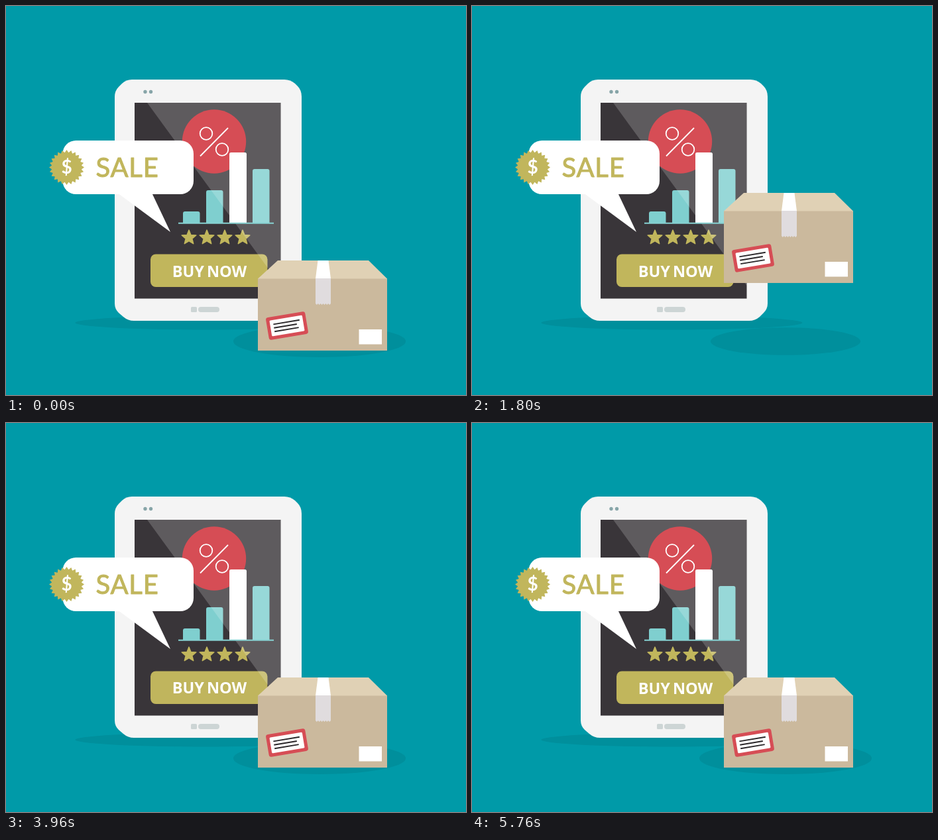
An HTML page for the animation above (5820 ms loop, 694 by 587 pixels).

```html
<!DOCTYPE html>
<html lang="en">
<head>
<meta charset="utf-8">
<title>Sale parcel</title>
<style>
  html, body { margin: 0; width: 100%; height: 100%; overflow: hidden; background: #009aa8; }
  svg { display: block; width: 100%; height: 100%; }
  .sale { font: 400 40px Lato, "Open Sans", sans-serif; letter-spacing: .8px; }
  .coin { font: 700 28px Lato, "Open Sans", sans-serif; }
  .buy { font: 700 23.5px "Open Sans", "Noto Sans", sans-serif; word-spacing: -2px; }
</style>
</head>
<body>
<svg viewBox="0 0 694 587">
  <defs>
    <clipPath id="aboveFloor"><rect y="-900" width="694" height="1469"/></clipPath>
    <clipPath id="doorway"><polygon id="opening"/></clipPath>
  </defs>
  <rect width="694" height="587" fill="#009aa8"/>
  <ellipse cx="301.500" cy="478" rx="197" ry="10.500" fill="#008f9c"/>
  <ellipse id="shadow" cx="473" cy="506" fill="#00808d" fill-opacity=".45"/>

  <g id="hole" clip-path="url(#doorway)">
    <polygon points="344,569 402,500 553,500 611,569" fill="#008592"/>
    <polygon points="344,569 402,500 476.500,500 390,569" fill="#007781"/>
  </g>

  <g id="tablet">
    <path fill="#f4f4f4" d="M190 111H420Q429 111 436 117L440 121Q446 127 446 137V449
      Q446 457 440 463L434 469Q427 475 418 475H193Q184 475 177 469L170 463
      Q164 457 164 449V137Q164 128 170 122L175 117Q181 111 190 111Z"/>
    <g fill="#87a5a8"><circle cx="210" cy="129.500" r="2.700"/><circle cx="218.500" cy="129.500" r="2.700"/></g>
    <g fill="#cdd5d5">
      <rect x="279" y="454" width="9" height="8" rx="1.500"/>
      <rect x="290" y="454" width="32" height="8" rx="4"/>
    </g>
    <rect x="194" y="146" width="220.500" height="295.500" fill="#393539"/>
    <g id="bars" fill="#7fcfcf"></g>
    <g id="stars" fill="#c1b65c" stroke="#c1b65c" stroke-width="1.500" stroke-linejoin="round"></g>
    <g id="button">
      <rect id="face" x="218" y="374.500" width="176.500" height="49.500" rx="8"/>
      <text class="buy" x="307" y="408.500" text-anchor="middle" fill="#fff">BUY NOW</text>
    </g>
    <polygon points="213,146 414.500,146 414.500,422" fill="#fff" fill-opacity=".19"/>
    <circle cx="314" cy="204.500" r="48.200" fill="#d64d55"/>
    <g fill="none" stroke="#fff" stroke-width="1.800">
      <path d="M335 184L293 226.500"/>
      <circle cx="302" cy="192.500" r="9.300"/><circle cx="326" cy="216.500" r="9.300"/>
    </g>
    <path d="M337 328V223.500Q337 221 339.500 221H360.500Q363 221 363 223.500V328Z" fill="#fff"/>
    <path d="M260 327.800H404" stroke="#86d1d1" stroke-width="2"/>
  </g>

  <g id="bubble">
    <rect x="85.500" y="203" width="197.500" height="81" rx="20" fill="#fff"/>
    <polygon points="168,282 220,282 248,341" fill="#fff"/>
    <polygon id="badge" fill="#c1b65c"/>
    <text class="coin" x="91.500" y="253" text-anchor="middle" fill="#fff">$</text>
    <text class="sale" x="135.500" y="257.500" fill="#c1b65c" stroke="#c1b65c" stroke-width="1" stroke-linejoin="round">SALE</text>
  </g>

  <g clip-path="url(#aboveFloor)">
    <g id="box">
      <rect x="380" y="411" width="195" height="109" fill="#cbb99d"/>
      <polygon points="410,384 547,384 575,411.500 380,411.500" fill="#e0d1b5"/>
      <polygon points="470.500,384 486.500,384 490,411.500 467,411.500" fill="#fff"/>
      <path id="tape" fill="#e0dcde"/>
      <g transform="translate(424 482.500) rotate(-9.500)">
        <rect x="-30" y="-17" width="60" height="34" rx="3.500" fill="#d64d55"/>
        <rect x="-25" y="-12" width="50" height="24" rx="1.500" fill="#fff"/>
        <path d="M-20 -5.500H20M-20 0H15M-20 5.500H17" stroke="#2b282b" stroke-width="1.900"/>
      </g>
      <rect x="532.500" y="488" width="34.500" height="22.500" fill="#fff"/>
    </g>
  </g>
</svg>
<script>
const LOOP = 5820, STEP = 60, SECOND = 3120;
const DROP = 1392, DROP_TIME = 1210, DROP_HEIGHT = 728;
const NS = "http://www.w3.org/2000/svg";
const $ = id => document.getElementById(id);
const set = (el, attrs) => { for (const k in attrs) el.setAttribute(k, attrs[k]); };
const add = (parent, tag, attrs) => {
  const el = document.createElementNS(NS, tag);
  set(el, attrs);
  parent.append(el);
};

function starPoints(cx, cy, n, outer, inner) {
  return Array.from({ length: n * 2 }, (_, i) => {
    const r = i % 2 ? inner : outer, a = i * Math.PI / n - Math.PI / 2;
    return (cx + r * Math.cos(a)).toFixed(2) + "," + (cy + r * Math.sin(a)).toFixed(2);
  }).join(" ");
}

for (const [x, y] of [[267, 310], [302, 278], [372, 246]])
  add($("bars"), "path", { d: `M${x} 328V${y + 3}q0-3 3-3h19.500q3 0 3 3V328Z` });
for (let i = 0; i < 4; i++)
  add($("stars"), "polygon", { points: starPoints(276 + 27 * i, 349.5, 5, 11.4, 5) });
set($("badge"), { points: starPoints(91.5, 243.5, 24, 26.5, 22.5) });
set($("tape"), { d: "M467 411V449" + "l1.917 2l1.917-2".repeat(6) + "V411Z" });

const ramp = (t, a, b) => Math.min(1, Math.max(0, (t - a) / (b - a)));
const smooth = u => u * u * (3 - 2 * u);
const mix = (a, b, k) => a.map((v, i) => Math.round(v + (b[i] - v) * k));

function bounce(u) {
  const k = 7.5625, d = 2.75;
  if (u < 1 / d) return k * u * u;
  if (u < 2 / d) return k * (u - 1.5 / d) ** 2 + .75;
  if (u < 2.5 / d) return k * (u - 2.25 / d) ** 2 + .9375;
  return k * (u - 2.625 / d) ** 2 + .984375;
}

// Offset of the parcel from rest: sinks through the floor, then drops from above.
function boxOffset(t) {
  if (t < 1020) return 0;
  if (t < DROP) return 6.5 * ((t - 1020) / 60) ** 2;
  return -DROP_HEIGHT * (1 - bounce(ramp(t, DROP, DROP + DROP_TIME)));
}

function draw(now) {
  const time = Math.floor(now % LOOP / STEP) * STEP;
  const t = time < 3300 ? time : time - SECOND;

  const y = boxOffset(t);
  set($("box"), { transform: `translate(0 ${y.toFixed(2)})` });

  const size = t < DROP ? 1 - ramp(t, 1100, 1240) : Math.max(0, 1 + y / 780);
  set($("shadow"), { rx: 130 * size, ry: 24 * size });

  // The floor opens from left to right and shuts the same way back.
  const open = smooth(ramp(t, 880, 1125)) * (1 - smooth(ramp(t, 1380, 1600)));
  const edge = 344 + 272 * open;
  set($("hole"), { visibility: open > 0 ? "visible" : "hidden" });
  set($("opening"), { points: `300,490 ${edge + 22},490 ${edge},569 300,569` });

  const press = ramp(t, 660, 1020) ** 4 * (1 - smooth(ramp(t, 1080, 1500)));
  const scale = 1 - .007 * press;
  set($("button"), { transform: `translate(306.250 399.250) scale(${scale}) translate(-306.250 -399.250)` });
  set($("face"), { fill: `rgb(${mix([193, 182, 92], [181, 171, 112], press)})` });
}

const start = performance.now();
(function tick() {
  draw(performance.now() - start);
  requestAnimationFrame(tick);
})();
</script>
</body>
</html>
```
